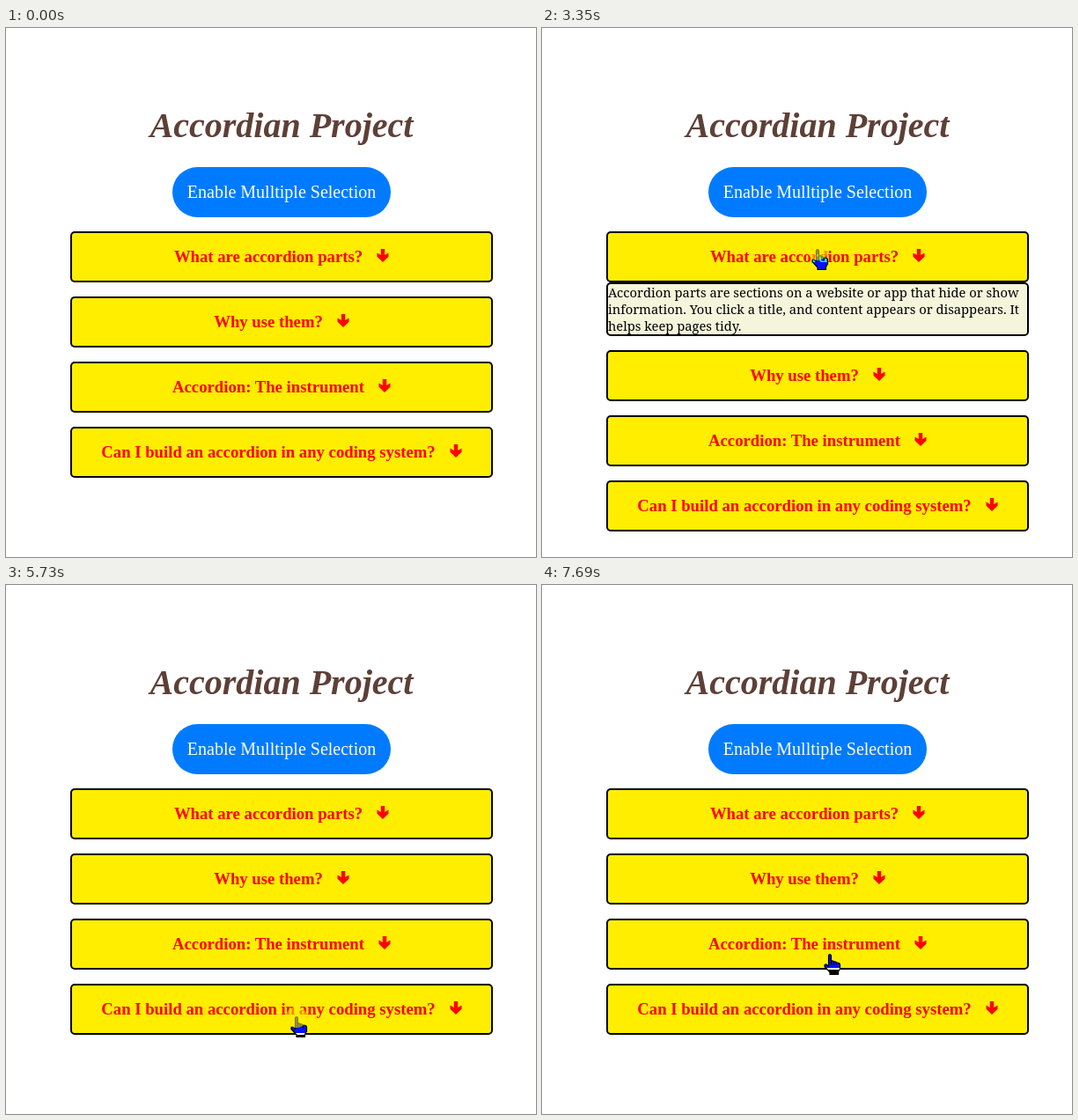
Write an HTML page that moves like this. It is 602 px wide and 601 px high and loops after 8000 ms.

```html
<!DOCTYPE html>
<html lang="en">
<head>
<meta charset="utf-8">
<title>Accordion</title>
<style>
  html, body { margin: 0; width: 100%; height: 100%; overflow: hidden; background: #fff; }
  #stage { position: relative; width: 602px; height: 601px; overflow: hidden; background: #fff;
    isolation: isolate; font-family: "Liberation Serif", "Times New Roman", serif; white-space: nowrap; }
  h1 { position: absolute; left: 73px; top: 88px; width: 480px; margin: 0; text-align: center;
    font: italic bold 40px/46px "Liberation Serif", serif; color: #5d4037; }
  #button { position: absolute; left: 189px; top: 158px; width: 248px; height: 57px; border-radius: 29px;
    background: #007bff; color: #fff; font-size: 20px; line-height: 57px; text-align: center; }
  #list { position: absolute; left: 73px; top: 231px; width: 480px; }
  .item { margin-bottom: 16px; }
  .head, .panel { box-sizing: border-box; border: 2px solid #000; border-radius: 5px; }
  .head { height: 58px; display: flex; justify-content: center; align-items: center; gap: 16px;
    background: #ffee00; color: #f00; font-size: 18.72px; font-weight: bold; }
  .head svg { width: 14px; height: 15px; margin-top: -3px; fill: #f00; }
  .panel { height: 61px; background: #f5f5dc; color: #000; font: 14.73px/19px "Noto Serif", Georgia, serif; }
  .layer { position: absolute; left: 0; top: 0; width: 602px; height: 601px; }
  #invert { mix-blend-mode: difference; fill: #fff; }
  #outline { fill: none; stroke: #000; stroke-width: 1.2; stroke-linejoin: round; }
  #glow { fill: #ffee00; fill-opacity: .55; stroke: none; }
</style>
</head>
<body>
<div id="stage">
  <h1>Accordian Project</h1>
  <div id="button">Enable Mulltiple Selection</div>
  <div id="list"></div>
  <svg id="invert" class="layer"><path class="cursor"/></svg>
  <svg id="outline" class="layer"><path class="cursor"/><circle id="glow" r="12"/></svg>
</div>
<script>
const LOOP = 8000, ENTER = 800, PRESS = 120;
const items = [
  ["What are accordion parts?",
   "Accordion parts are sections on a website or app that hide or show<br>information. You click a title, and content appears or disappears. It<br>helps keep pages tidy."],
  ["Why use them?",
   "They save space and make a page easier to read. Visitors open only<br>the sections they need, so long pages stay short and simple to<br>look through."],
  ["Accordion: The instrument",
   "The accordion is a musical instrument played by pressing keys or<br>buttons while moving the bellows in and out. It is often heard in<br>folk music."],
  ["Can I build an accordion in any coding system?",
   "Yes, you can build one in almost any language or framework. All it<br>needs is a list of titles, some content, and a way to show or hide<br>each part."]
];

// Pointer moves: start, end, destination, sideways bend
const moves = [
  { from: ENTER, to: 1470, x: 306, y: 219, bend: .115 },
  { from: 1640, to: 1890, x: 308, y: 264 },
  { from: 2540, to: 2680, x: 309, y: 282 },
  { from: 2790, to: 2940, x: 313, y: 251 },
  { from: 3650, to: 4070, x: 314, y: 334 },
  { from: 5040, to: 5540, x: 330, y: 490 },
  { from: 6490, to: 6880, x: 327, y: 419 }
];

// Each visited item is toggled open, then closed
const visits = [0, 1, 3, 2];
const toggles = [2290, 3450, 4320, 5040, 5850, 6490, 7080, 7690];

const HAND = "M-1.5 14.5V2.5Q-1.5 .5 0 .5T1.5 2.5V8Q3.5 7.3 4.5 9Q6.5 8.3 7.5 10Q11.5 9.7 11.5 13V17L9.5 20.5V23.5H0V21L-6 14.5Q-6.5 11.5-4 12Z" +
  "M1.5 8V12.5M4.5 9V13M7.5 10V13";
const ARROW = "M.5 .5V16.5L4 13.3 6.5 18.8 9 17.8 6.5 12.3H11.5Z";

const $ = id => document.getElementById(id);
$("list").innerHTML = items.map(([title, text]) =>
  `<div class="item"><div class="head"><span>${title}</span>
  <svg viewBox="0 0 14 15"><path d="M4.8 0h4.4v7l4.3-2.6v4.4L7 15 .5 8.8V4.4L4.8 7z"/></svg></div>
  <div class="panel">${text}</div></div>`).join("");
const panels = document.querySelectorAll(".panel");
const cursors = document.querySelectorAll(".cursor");
const glow = $("glow");

function pointerAt(t) {
  let x = 525, y = 578;
  for (const { from, to, x: endX, y: endY, bend = 0 } of moves) {
    if (t < from) break;
    const k = Math.min(1, (t - from) / (to - from));
    const u = 1 - (1 - k) ** 1.8;
    const dx = endX - x, dy = endY - y, bow = 2 * u * (1 - u) * bend;
    x += dx * u + dy * bow;
    y += dy * u - dx * bow;
  }
  return [x, y];
}

function overHead(y, open) {
  return items.some((_, i) => {
    const top = 231 + 74 * i + (open >= 0 && open < i ? 61 : 0);
    return y >= top && y < top + 58;
  });
}

function draw(t) {
  const done = toggles.filter(at => at <= t).length;
  const open = done % 2 ? visits[done >> 1] : -1;
  panels.forEach((p, i) => p.style.display = i === open ? "block" : "none");

  const [x, y] = pointerAt(t);
  const shape = overHead(y, open) ? HAND : ARROW;
  for (const c of cursors) {
    c.style.display = t < ENTER ? "none" : "";
    c.setAttribute("d", shape);
    c.setAttribute("transform", `translate(${Math.round(x)} ${Math.round(y)})`);
  }
  glow.style.display = toggles[done] - t <= PRESS ? "" : "none";
  glow.setAttribute("cx", x);
  glow.setAttribute("cy", y + 1);
}

const start = performance.now();
function tick() {
  draw((performance.now() - start) % LOOP);
  requestAnimationFrame(tick);
}
tick();
</script>
</body>
</html>
```
